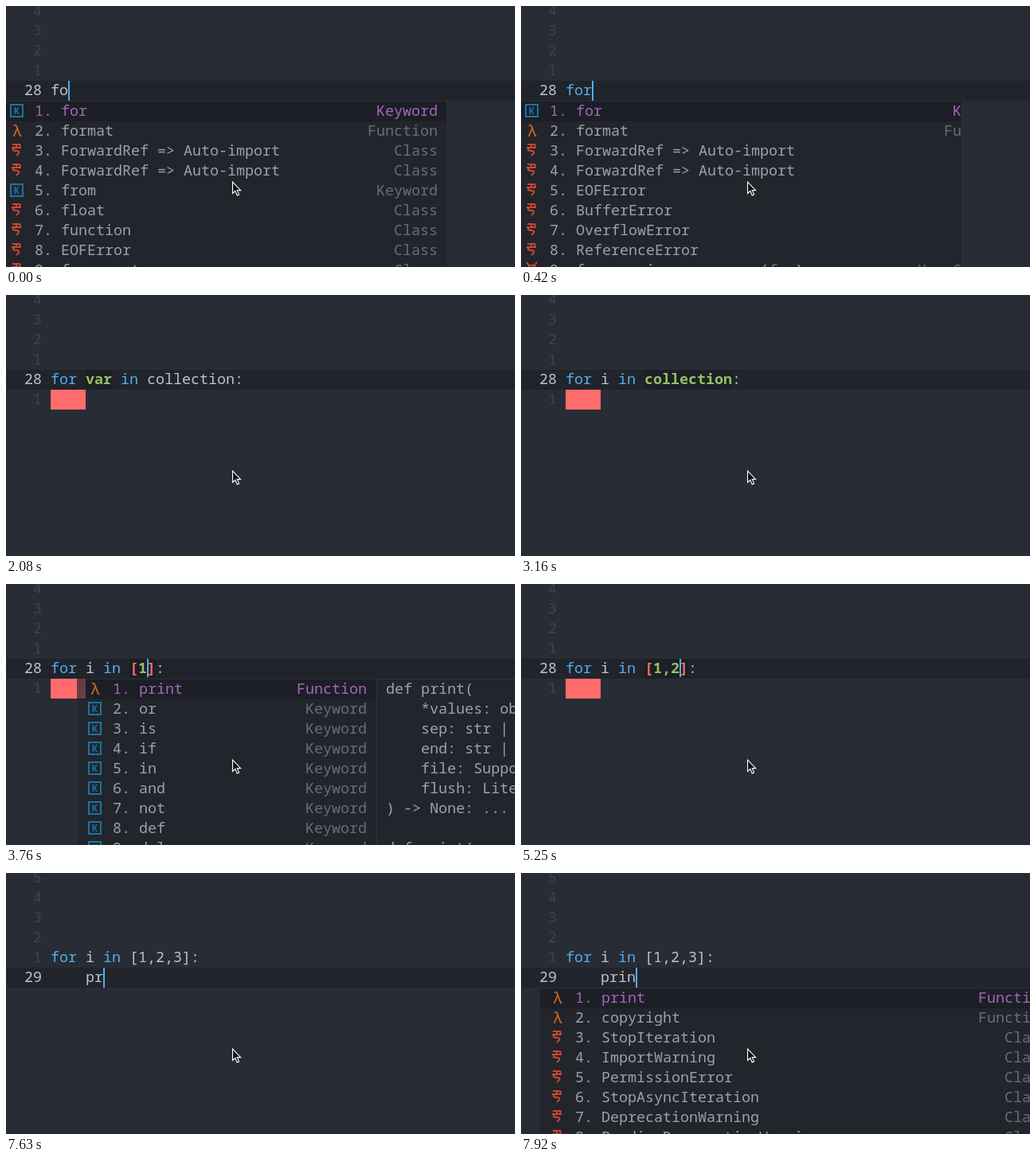
These frames come from a looping animation (639 by 328 pixels, 8000 ms). An HTML page:

```html
<!DOCTYPE html>
<html>
<head>
<meta charset="utf-8">
<style>
html, body { margin: 0; width: 100%; height: 100%; overflow: hidden; background: #282c34; }
svg { display: block; }
text { font: 18.333px "Noto Sans Mono", "DejaVu Sans Mono", monospace; white-space: pre; fill: #bbc2cf; }
.num { fill: #3f444a; }
.kw { fill: #51afef; }
.field { fill: #98be65; font-weight: bold; }
.paren { fill: #ff6c6b; font-weight: bold; }
.item { fill: #9da1a9; }
.label { fill: #696d74; }
.sel { fill: #a566ba; }
.key { fill: #4b86b4; }
.lambda { fill: #d9691e; font-size: 20px; }
.icon { fill: none; stroke: #c9482e; stroke-width: 2; }
.box { fill: none; stroke: #1b73a3; stroke-width: 2; }
.boxK { fill: #1b73a3; font-size: 12px; font-weight: bold; }
</style>
</head>
<body>
<svg id="stage" width="639" height="328"></svg>
<script>
const CH = 11, ROW = 25, LEFT = 56, LOOP = 8000;
const stage = document.getElementById('stage');

const LABELS = { K: 'Keyword', F: 'Function', C: 'Class', S: 'Yas-Snippet' };
const CLASS_ICON = 'M3 4H11Q14 4 12 7M2 8H14M8 8Q3 8 4 11Q5 12 9 12Q14 13 8 18M8 4V8';
const SNIPPET_ICON = 'M2 2L5 6H12L15 2M3 9H14M5 6V15M12 6V15';

const rect = (x, y, w, h, fill) => `<rect x="${x}" y="${y}" width="${w}" height="${h}" fill="${fill}"/>`;
const text = (x, y, s, c = '') => `<text x="${x}" y="${y + 18}" class="${c}">${s}</text>`;
const path = (x, y, d) => `<path class="icon" transform="translate(${x} ${y})" d="${d}"/>`;

function icon(kind, x, y) {
  if (kind === 'K') return `<rect class="box" x="${x + 1}" y="${y + 4}" width="15" height="15"/>` +
    `<text class="boxK" x="${x + 5}" y="${y + 16}">K</text>`;
  if (kind === 'F') return text(x + 3, y + 1, 'λ', 'lambda');
  return path(x, y, kind === 'C' ? CLASS_ICON : SNIPPET_ICON);
}

// Menu: x = item text, end = right edge of labels, clip = right edge of window
function drawMenu({ x, end, clip, rows }, top) {
  const left = Math.max(0, x - 77);
  let out = rect(left, top - 1, clip - left, 328, '#2a2e36') +
    rect(left, top, clip - left - 1, 328, '#22252c') +
    rect(left, top, clip - left - 1, ROW, '#1c1f26');
  rows.forEach((row, i) => {
    const kind = row[0], y = top + i * ROW, label = LABELS[kind];
    const [name, key] = row.slice(2).split('|');
    out += icon(kind, x - 64, y) +
      text(x - 33, y, `${i + 1}. ${name}`, i ? 'item' : 'sel') +
      text(end - label.length * CH, y, label, i ? 'label' : 'sel');
    if (key) {
      const kx = x + name.length * CH;
      out += text(kx, y, '(', 'item') + text(kx + CH, y, key, 'key') +
        text(kx + CH * (key.length + 1), y, ')', 'item');
    }
  });
  return `<svg width="${clip}" height="328">${out}</svg>`;
}

function drawDoc(lines, x, top) {
  return rect(x, top - 1, 639, 328, '#30343c') + rect(x + 1, top, 639, 328, '#22252c') +
    lines.map((s, i) => text(x + 12, top + i * ROW, s, 'item')).join('');
}

// Code tokens are [string, class, hasBackground]
function drawCode(tokens, y) {
  let x = LEFT, out = '';
  for (const [s, c, bg] of tokens) {
    const w = s.length * CH;
    if (bg) out += rect(x, y, w, ROW - 1, '#1c1f24');
    out += text(x, y, s, c);
    x += w;
  }
  return out;
}

// active: 'name' or 'list' is the snippet field being edited; 'paren' lights the brackets
function loop(name, list, active) {
  const inList = active === 'list';
  const parts = list.match(/[\[\]]|[^\[\]]+/g).map(s => {
    const bracket = s === '[' || s === ']';
    if (bracket && (inList || active === 'paren')) return [s, 'paren', true];
    return [s, inList ? 'field' : '', inList];
  });
  const named = active === 'name';
  return [['for', 'kw'], [' '], [name, named ? 'field' : '', named], [' '], ['in', 'kw'], [' '], ...parts, [':']];
}

const shared = ['K for', 'F format', 'C ForwardRef => Auto-import', 'C ForwardRef => Auto-import'];
const errors = [...shared, 'C EOFError', 'C BufferError', 'C OverflowError', 'C ReferenceError'];
const foMenu = { x: 69, end: 542, clip: 554,
  rows: [...shared, 'K from', 'C float', 'C function', 'C EOFError', 'C frozenset'] };
const forMenu = { ...foMenu, rows: [...errors, 'C FloatingPointError'] };
const snipMenu = { ...foMenu, end: 619, rows: [...errors, 'S for ... in ... : ... |for'] };
const listMenu = { x: 167, end: 453, clip: 466,
  rows: ['F print', 'K or', 'K is', 'K if', 'K in', 'K and', 'K not', 'K def', 'K del'] };
const printMenu = { x: 101, end: 662, clip: 674,
  rows: ['F print', 'F copyright', 'C StopIteration', 'C ImportWarning', 'C PermissionError',
    'C StopAsyncIteration', 'C DeprecationWarning', 'C PendingDeprecationWarning'] };
const printDoc = ['def print(', '    *values: object,', '    sep: str | None = " ",', '    end: str | None = "\\n",',
  '    file: SupportsWrite[str]', '    flush: Literal[False]', ') -> None: ...', '', 'def print('];

const edit = (list, col) => ({ code: loop('i', list, 'list'), col, on: true });
const type = s => ({ body: s, col: 4 + s.length, on: true });

// Each step changes part of the state at its time
const steps = [
  [0, { code: [['fo']], col: 2, on: true, menu: foMenu }],
  [120, { code: [['for', 'kw']], col: 3 }],
  [240, { menu: forMenu }],
  [420, { menu: snipMenu }],
  [470, { menu: { ...snipMenu, clip: 631 } }],
  [650, { on: false }],
  [1130, { menu: null }],
  [1180, { on: true }],
  [1540, { code: loop('var', 'collection', 'name'), col: 4, block: true }],
  [2080, { on: false }],
  [2320, { code: loop('i', 'collection', 'name'), col: 5, on: true }],
  [2620, edit('collection', 9)],
  [3160, { on: false }],
  [3460, edit('[]', 10)],
  [3580, { menu: listMenu, doc: printDoc }],
  [3760, edit('[1]', 11)],
  [3880, { ...edit('[1,]', 12), menu: null, doc: null }],
  [4360, edit('[1,3]', 13)],
  [4960, { on: false }],
  [5130, edit('[1,]', 12)],
  [5250, edit('[1,2]', 13)],
  [5660, edit('[1,2,]', 14)],
  [5960, edit('[1,2,3]', 15)],
  [6500, { code: loop('i', '[1,2,3]', 'paren'), block: false, newline: true, ...type('') }],
  [6680, { code: loop('i', '[1,2,3]') }],
  [7040, { on: false }],
  [7510, type('p')],
  [7630, type('pr')],
  [7690, { menu: printMenu }],
  [7810, type('pri')],
  [7920, type('prin')]
];

function draw(s) {
  const cur = s.newline ? 119 : 94;
  let out = rect(1, cur, 638, ROW, '#21242b');
  for (let y = -6; y < cur; y += ROW) out += text(34, y, (cur - y) / ROW, 'num');
  out += text(23, cur, s.newline ? 29 : 28) + drawCode(s.code, 94);
  if (s.newline) out += text(LEFT + 4 * CH, 119, s.body);
  if (s.block) out += text(34, 119, 1, 'num') + rect(LEFT, 119, 44, ROW, '#ff6c6b');
  if (s.on) out += rect(LEFT + s.col * CH, cur, 2, s.block ? 23 : ROW, '#51afef');
  if (s.menu) out += drawMenu(s.menu, cur + 26);
  if (s.menu && s.block) out += rect(89, 119, 11, ROW, '#693d42');
  if (s.doc) out += drawDoc(s.doc, 465, 120);
  // Mouse pointer
  out += '<path d="M284.5 221V235.5L287.8 232.5L290.2 238L292.6 237L290.2 231.6H294.6Z" fill="#111" stroke="#fff" stroke-width="1.1"/>';
  stage.innerHTML = out;
}

let shown = -1;
const start = performance.now();
function frame() {
  const t = (performance.now() - start) % LOOP;
  const n = steps.filter(([at]) => at <= t).length;
  if (n !== shown) {
    shown = n;
    draw(Object.assign({}, ...steps.slice(0, n).map(([, change]) => change)));
  }
  requestAnimationFrame(frame);
}
frame();
</script>
</body>
</html>
```
